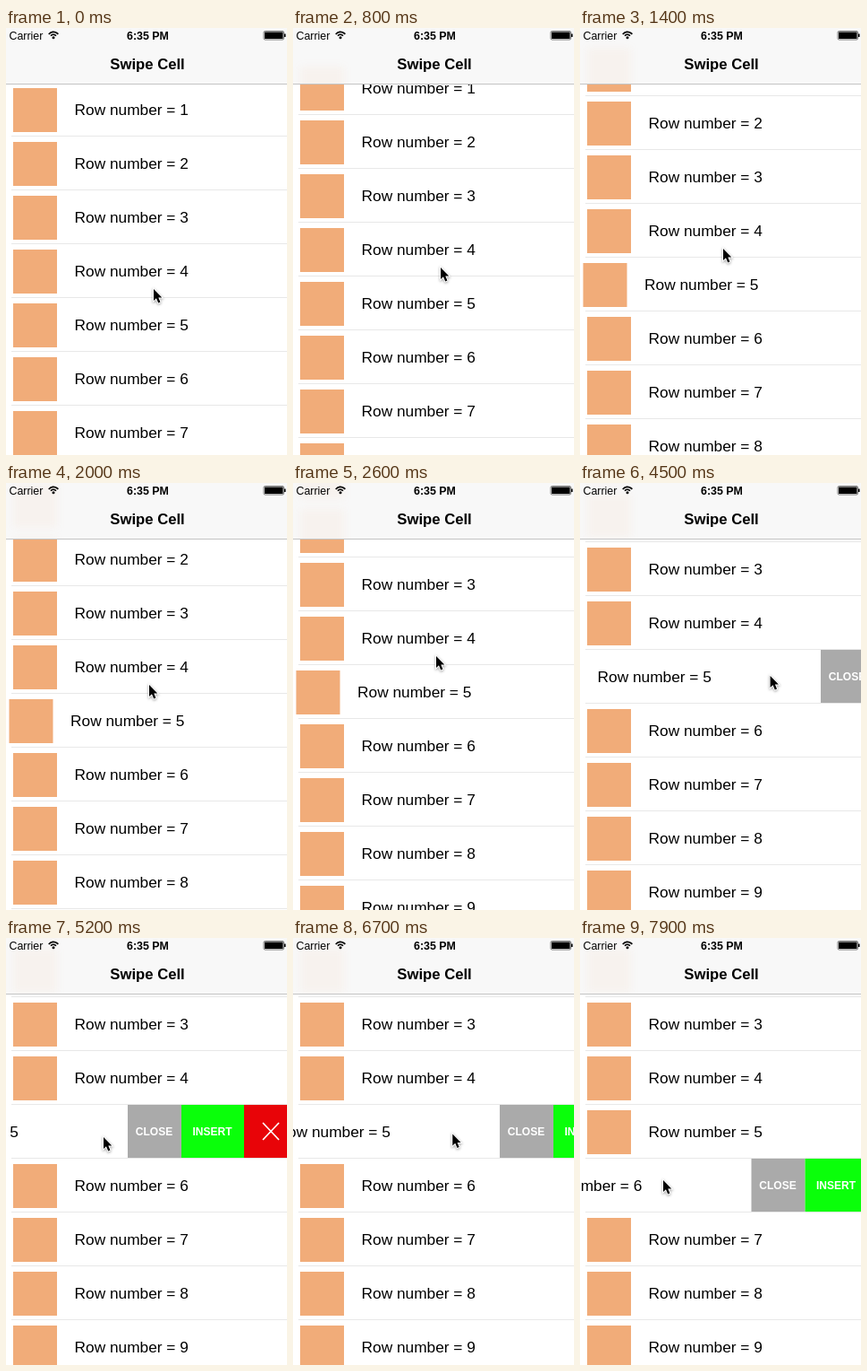
Write an HTML page with a canvas that moves like this. It is 314 px wide and 476 px high and loops after 8 s.

```html
<!DOCTYPE html>
<html>
<head>
<meta charset="utf-8">
<style>
  html, body { margin: 0; height: 100%; overflow: hidden; background: #fff; }
  canvas { display: block; }
</style>
</head>
<body>
<canvas id="stage" width="314" height="476"></canvas>
<script>
const ctx = document.getElementById('stage').getContext('2d');
const W = 314, H = 476, LOOP = 8000, STEP = 100;
const ROW = 60, HEADER = 62, CELL_WIDTH = 326, OPEN = 190;
const FONT = '"Liberation Sans", Arial, sans-serif';
const ORANGE = '#f1ac79';

// Progress from 0 to 1 between two times; power 1 is linear.
function ramp(t, from, to, power = 1) {
  return Math.min(1, Math.max(0, (t - from) / (to - from))) ** power;
}

function smooth(p) {
  return p * p * (3 - 2 * p);
}

function scrollAt(t) {
  return Math.round(66 * ramp(t, 0, 2000, 1.1) + 49 * ramp(t, 2000, 2920));
}

// A small sideways pull on row 5 while the list is dragged
function nudgeAt(t) {
  return -4.5 * (ramp(t, 800, 1300) - ramp(t, 3000, 3300));
}

function swipeAt(row, t) {
  if (row === 5) return nudgeAt(t) - OPEN * (ramp(t, 4200, 5200) - smooth(ramp(t, 6500, 6900)));
  if (row === 6) return -134.5 * ramp(t, 7400, 7900);
  return 0;
}

function pointerAt(t) {
  let x = 165, y = 291 - scrollAt(t);
  const move = (from, to, dx, dy) => {
    const p = ramp(t, from, to);
    x += dx * p;
    y += dy * p;
  };
  move(800, 1300, -5, 0);
  move(3000, 3900, 97, 36);    // to row 5
  move(4200, 5200, -148, 10);  // swipe it open
  move(5200, 5700, -11, 36);
  move(5700, 6100, 72, -48);   // to its CLOSE button
  move(6600, 7300, 58, 60);    // to row 6
  move(7400, 7900, -135, 0);   // swipe it open
  return [x, y];
}

function rect(x, y, w, h, color) {
  ctx.fillStyle = color;
  ctx.fillRect(x, y, w, h);
}

function text(str, x, y, size, { color = '#000', weight = 'normal', align = 'left' } = {}) {
  ctx.font = `${weight} ${size}px ${FONT}`;
  ctx.textAlign = align;
  ctx.fillStyle = color;
  ctx.fillText(str, x, y);
}

function drawButtons(x, y) {
  const label = { color: '#fff', weight: 'bold', align: 'center' };
  rect(x, y, 60, 59, '#aaa');
  rect(x + 60, y, 70, 59, '#0aff0a');
  rect(x + 130, y, 60, 59, '#e80408');
  text('CLOSE', x + 29.5, y + 34, 12, label);
  text('INSERT', x + 94.5, y + 34, 12, label);
  ctx.strokeStyle = '#fff';
  ctx.lineWidth = 1.7;
  ctx.beginPath();
  for (const side of [-9, 9]) {
    ctx.moveTo(x + 160 - side, y + 20);
    ctx.lineTo(x + 160 + side, y + 39);
  }
  ctx.stroke();
}

function drawRows(scroll, t) {
  for (let n = 1; n <= 10; n++) {
    const top = 61 + ROW * (n - 1) - scroll;
    const shift = swipeAt(n, t);
    rect(6, top + 59, W - 6, 1, '#e8e8e8');
    rect(8 + shift, top + 6, 49, 49, ORANGE);
    text('Row number = ' + n, 76.6 + shift, top + 36, 17.3);
    drawButtons(CELL_WIDTH + shift, top);
  }
}

function drawWifi() {
  ctx.strokeStyle = '#000';
  ctx.lineWidth = 1.7;
  for (const r of [3.7, 6.6]) {
    ctx.beginPath();
    ctx.arc(53, 11, r, -Math.PI * 0.79, -Math.PI * 0.21);
    ctx.stroke();
  }
  ctx.fillStyle = '#000';
  ctx.beginPath();
  ctx.arc(53, 10.8, 1.5, 0, Math.PI * 2);
  ctx.fill();
}

function drawBattery() {
  ctx.strokeStyle = '#555';
  ctx.lineWidth = 0.8;
  ctx.beginPath();
  ctx.roundRect(288, 3.5, 22.5, 9.5, 1.5);
  ctx.stroke();
  rect(289, 4.5, 20.5, 7.5, '#000');
  rect(311, 6.5, 1.5, 3.5, '#000');
}

function drawHeader(scroll) {
  rect(0, 0, W, HEADER, '#f8f8f8');
  // Soft glow of the squares passing behind the bar
  ctx.save();
  ctx.beginPath();
  ctx.rect(0, 0, W, HEADER);
  ctx.clip();
  ctx.globalAlpha = 0.07;
  ctx.filter = 'blur(4px)';
  for (let n = 1; n <= 3; n++) rect(8, 67 + ROW * (n - 1) - scroll, 49, 49, ORANGE);
  ctx.restore();
  rect(0, HEADER, W, 1, '#c4c4c4');

  text('Carrier', 3.5, 13, 12.4);
  text('6:35 PM', 158.5, 13, 12.4, { weight: 'bold', align: 'center' });
  text('Swipe Cell', 158, 46, 16.7, { weight: 'bold', align: 'center' });
  drawWifi();
  drawBattery();
}

function drawPointer(x, y) {
  ctx.save();
  ctx.translate(x, y);
  ctx.scale(0.93, 0.93);
  const arrow = new Path2D('M0 0V14L3.2 11L5.6 16.6L8 15.6L5.7 10.2H10Z');
  ctx.shadowColor = 'rgba(0,0,0,.4)';
  ctx.shadowBlur = 3;
  ctx.shadowOffsetY = 1;
  ctx.strokeStyle = '#fff';
  ctx.lineWidth = 2;
  ctx.stroke(arrow);
  ctx.shadowColor = 'transparent';
  ctx.fillStyle = '#000';
  ctx.fill(arrow);
  ctx.restore();
}

const start = performance.now();

function frame() {
  const elapsed = (performance.now() - start) % LOOP;
  const t = Math.floor(elapsed / STEP) * STEP;
  const scroll = scrollAt(t);
  rect(0, 0, W, H, '#fff');
  drawRows(scroll, t);
  drawHeader(scroll);
  drawPointer(...pointerAt(t));
  requestAnimationFrame(frame);
}
frame();
</script>
</body>
</html>
```
